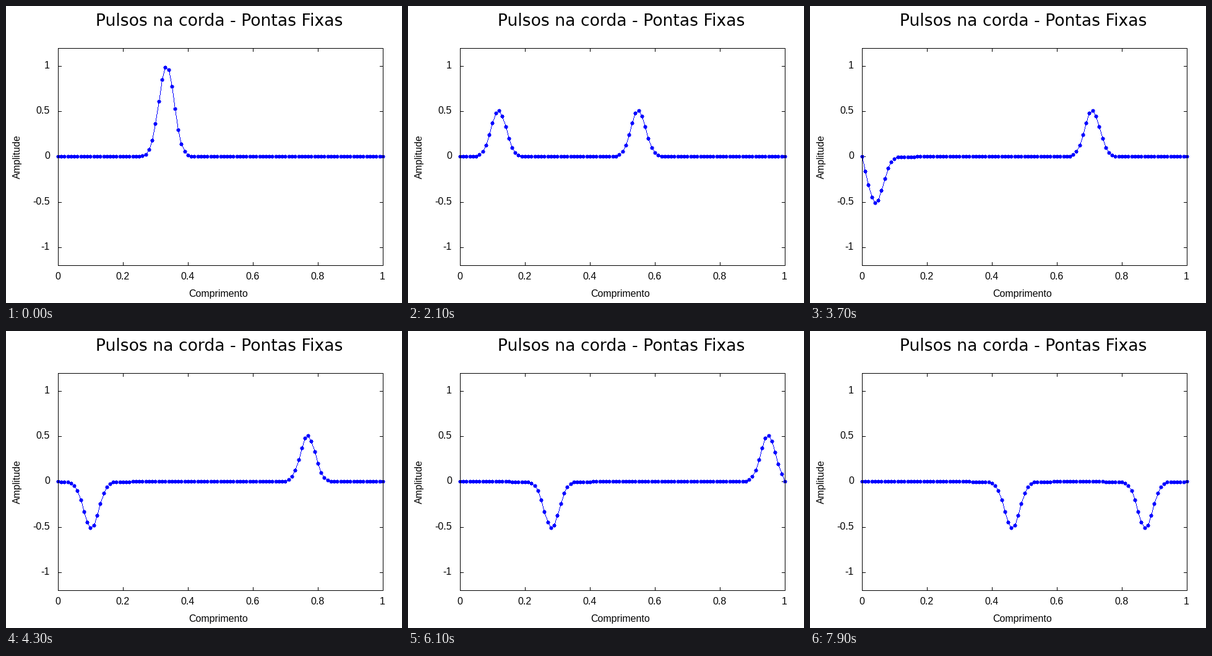
A matplotlib script that plays this animation: 640 px wide and 480 px high, repeating every 8 s.

```python
import numpy as np
import matplotlib.pyplot as plt
from matplotlib.animation import FuncAnimation
from matplotlib.collections import PolyCollection

W, H, DPI = 640, 480, 100
PT = 72 / DPI                          # points per pixel
LEFT, RIGHT, TOP, BOTTOM = 84, 609, 68, 419
CELLS, FRAMES = 100, 80
BLUE = "#0000ff"

plt.rcParams["text.hinting"] = "default"


def px_x(x):
    return LEFT + np.floor((RIGHT - LEFT) * x + 0.5)


def px_y(y):
    return BOTTOM - np.floor((BOTTOM - TOP) * (y + 1.2) / 2.4 + 0.5 + 1e-9)


def simulate():
    """Leapfrog wave equation at unit Courant number, both ends fixed."""
    # Single precision positions settle the half-pixel ties
    x = (np.arange(CELLS + 1, dtype=np.float32) * np.float32(0.01)).astype(float)
    now = np.exp(-900 * (x - 1 / 3) ** 2)
    prev = now.copy()
    states = [now]
    for _ in range(FRAMES - 1):
        new = np.zeros_like(now)
        new[1:-1] = now[2:] + now[:-2] - prev[1:-1]
        prev, now = now, new
        states.append(now)
    states = np.array(states)
    states[np.abs(states) < 2e-7] = 0
    return x, states


def segment(a, b):
    """Pixels of a one-pixel Bresenham line from a to b."""
    step = b - a
    major = int(abs(step[1]) > abs(step[0]))
    if step[major] < 0:
        a, step = b, -step
    n = int(step[major])
    k = np.arange(n + 1)[:, None]
    return a + np.sign(step) * np.floor(k * np.abs(step) / max(n, 1) + 0.5)


def polyline(points):
    pixels = [segment(a, b) for a, b in zip(points[:-1], points[1:])]
    return np.unique(np.vstack(pixels), axis=0)


def stamp(shape, pixels):
    return (pixels + 0.5)[:, None, :] + shape


fig = plt.figure(figsize=(W / DPI, H / DPI), dpi=DPI, facecolor="white")
ax = fig.add_axes([0, 0, 1, 1])
ax.set_xlim(0, W)
ax.set_ylim(H, 0)
ax.axis("off")


def stroke(xs, ys, z=1):
    ax.plot(np.asarray(xs) + 0.5, np.asarray(ys) + 0.5, color="black",
            lw=PT, zorder=z, snap=False,
            solid_capstyle="projecting", solid_joinstyle="miter")


def label(x, y, text, ha="center", size=16, font="Liberation Sans", rot=0):
    ax.text(x, y, text, ha=ha, va="baseline", fontsize=size * PT,
            family=font, rotation=rot, rotation_mode="anchor")


def shapes(z):
    group = PolyCollection([], facecolors=BLUE, edgecolors="none",
                           antialiaseds=False, zorder=z)
    ax.add_collection(group, autolim=False)
    return group


# Frame, ticks and labels
stroke([LEFT, RIGHT, RIGHT, LEFT, LEFT], [TOP, TOP, BOTTOM, BOTTOM, TOP], z=5)
TICK = 5
for v in np.arange(6) / 5:
    tx = px_x(v)
    stroke([tx, tx], [BOTTOM, BOTTOM - TICK])
    stroke([tx, tx], [TOP, TOP + TICK])
    label(tx - 0.5, 442, f"{v:g}")
for v in (-1, -0.5, 0, 0.5, 1):
    ty = px_y(v)
    stroke([LEFT, LEFT + TICK], [ty, ty])
    stroke([RIGHT, RIGHT - TICK], [ty, ty])
    label(71, ty + 4, f"{v:g}", ha="right")

label(344.5, 32, "Pulsos na corda - Pontas Fixas", size=80 / 3, font="DejaVu Sans")
label(343.5, 470, "Comprimento")
label(23, 244, "Amplitude", rot=90)

# String: thin line plus a square dot with a one-pixel spike on each side
grid, states = simulate()
cols = px_x(grid)
rows = px_y(states)

quarter = np.array([(-0.5, -3.5), (0.5, -3.5), (0.5, -2.5), (2.5, -2.5), (2.5, -0.5)])
turn = np.array([(0, 1), (-1, 0)])
dot = np.vstack([quarter @ np.linalg.matrix_power(turn, k) for k in range(4)])
pixel = np.array([(-0.5, -0.5), (0.5, -0.5), (0.5, 0.5), (-0.5, 0.5)])

string = shapes(3)
dots = shapes(4)


def draw(i):
    points = np.column_stack([cols, rows[i]])
    string.set_verts(stamp(pixel, polyline(points)))
    dots.set_verts(stamp(dot, points))
    return string, dots


anim = FuncAnimation(fig, draw, frames=FRAMES, interval=100,
                     repeat=True, repeat_delay=0, blit=False)
plt.show()
```
